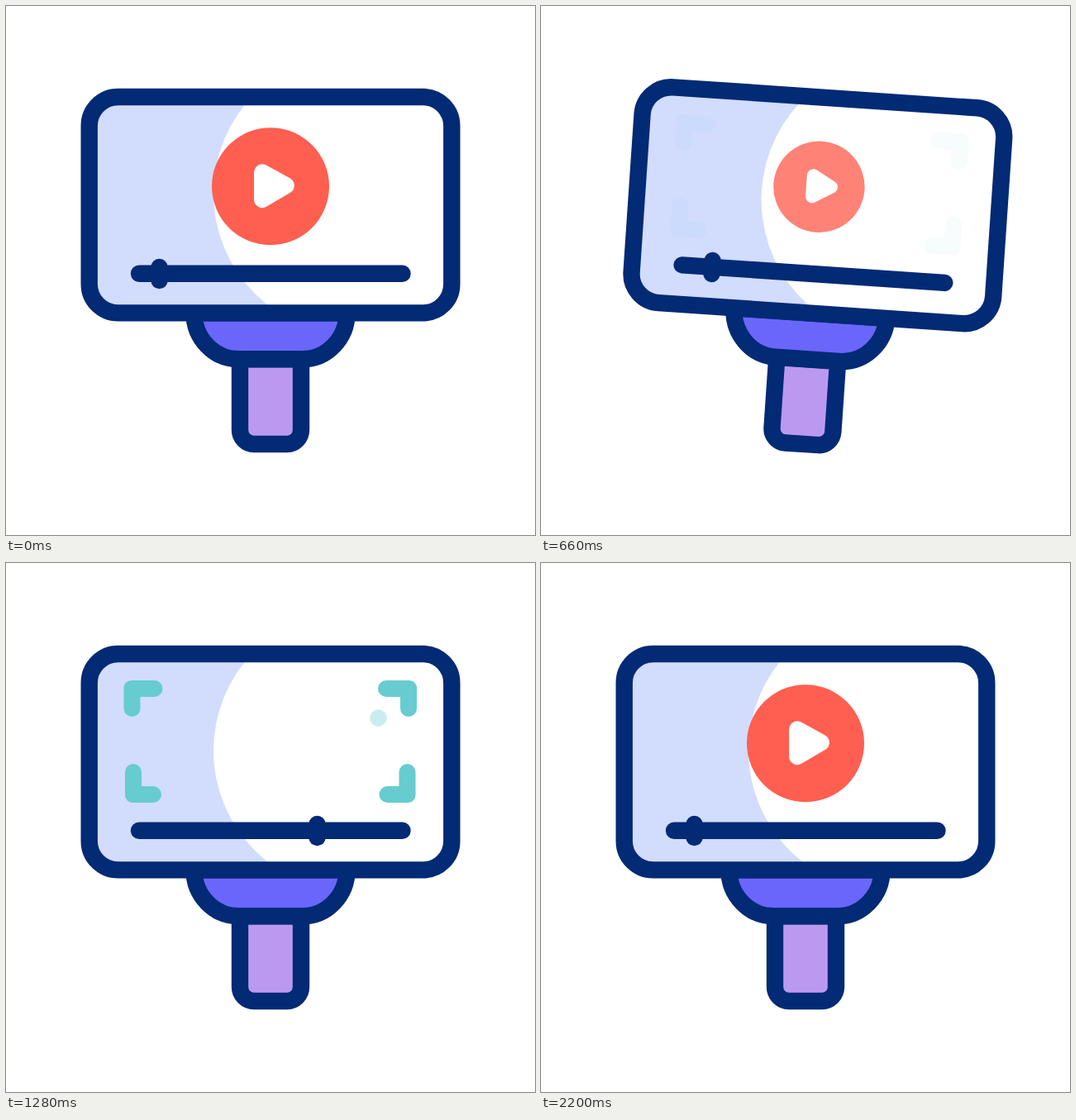
These frames come from a looping animation (640x640 px, 2400 ms). An HTML page:

```html
<!DOCTYPE html>
<html lang="en">
<head>
<meta charset="utf-8">
<title>Video on a selfie stick</title>
<style>
  html, body { margin: 0; height: 100%; overflow: hidden; background: #fff; }
  svg { display: block; width: 100%; height: 100%; }
  .line { stroke: #022a75; stroke-width: 20.4; stroke-linecap: round; }
</style>
</head>
<body>
<svg viewBox="0 0 640 640" fill="none">
  <defs>
    <rect id="frame" x="100.7" y="110" width="438.6" height="261.4" rx="35"/>
    <clipPath id="screen"><use href="#frame"/></clipPath>
    <path id="bracket" d="M0 9a9 9 0 0 1 9-9H37a10 10 0 0 1 0 20H20V34a10 10 0 0 1-20 0z"/>
  </defs>
  <g id="device">
    <path class="line" fill="#bc99f1" d="M283 427V513a17 17 0 0 0 17 17H340a17 17 0 0 0 17-17V427z"/>
    <path class="line" fill="#6b66fb" d="M227.500 371.300a54 56 0 0 0 54 56H358.500a54 56 0 0 0 54-56z"/>
    <g clip-path="url(#screen)">
      <rect x="100" y="110" width="330" height="262" fill="#d2dcfd"/>
      <circle cx="422" cy="227" r="171" fill="#fff"/>
    </g>
    <use href="#frame" class="line"/>
    <g id="play">
      <circle r="71" fill="#ff5f50"/>
      <path d="M-10-17L19-1L-10 16z" fill="#fff" stroke="#fff" stroke-width="20" stroke-linejoin="round"/>
    </g>
    <g id="brackets" fill="#67cccf">
      <g id="pair">
        <use href="#bracket" transform="translate(142.5 142)"/>
        <use href="#bracket" transform="translate(144 290) rotate(-90)"/>
      </g>
      <use href="#pair" transform="translate(639.5 0) scale(-1 1)"/>
    </g>
    <circle id="dot" cx="450.5" cy="187.5" r="10.2" fill="#67cccf"/>
    <path class="line" d="M161 323.800H479.500"/>
    <path id="knob" class="line" d="M0 316V332"/>
  </g>
</svg>
<script>
  const LOOP = 2400, BEAT = 200;
  const [device, play, brackets, dot, knob] =
    ['device', 'play', 'brackets', 'dot', 'knob'].map(id => document.getElementById(id));

  // Smooth 0 to 1 between two beats
  function ease(beat, from, to) {
    const p = Math.min(1, Math.max(0, (beat - from) / (to - from)));
    return p * p * (3 - 2 * p);
  }

  function draw(beat) {
    const camera = ease(beat, 3, 5) - ease(beat, 9, 11);
    const shrink = ease(beat, 1, 3) - ease(beat, 9, 11);
    const hidden = ease(beat, 3, 4) - ease(beat, 9, 10);
    const swing = 2 * ease(beat, 2, 3) - 2 * ease(beat, 3, 4) + ease(beat, 4, 5) - ease(beat, 1, 2);
    const blink = beat > 4 && beat < 10 ? (1 - Math.cos(Math.PI * beat)) / 2 : 0;

    device.setAttribute('transform', `rotate(${7 * swing} 320 460)`);
    play.setAttribute('transform', `translate(320 218.2) scale(${1 - 0.223 * shrink})`);
    play.setAttribute('opacity', 1 - hidden);
    brackets.setAttribute('opacity', camera);
    knob.setAttribute('transform', `translate(${185.5 + 191 * camera} 0)`);
    dot.setAttribute('opacity', blink);
  }

  const start = performance.now();
  function tick() {
    draw((performance.now() - start) % LOOP / BEAT);
    requestAnimationFrame(tick);
  }
  tick();
</script>
</body>
</html>
```
